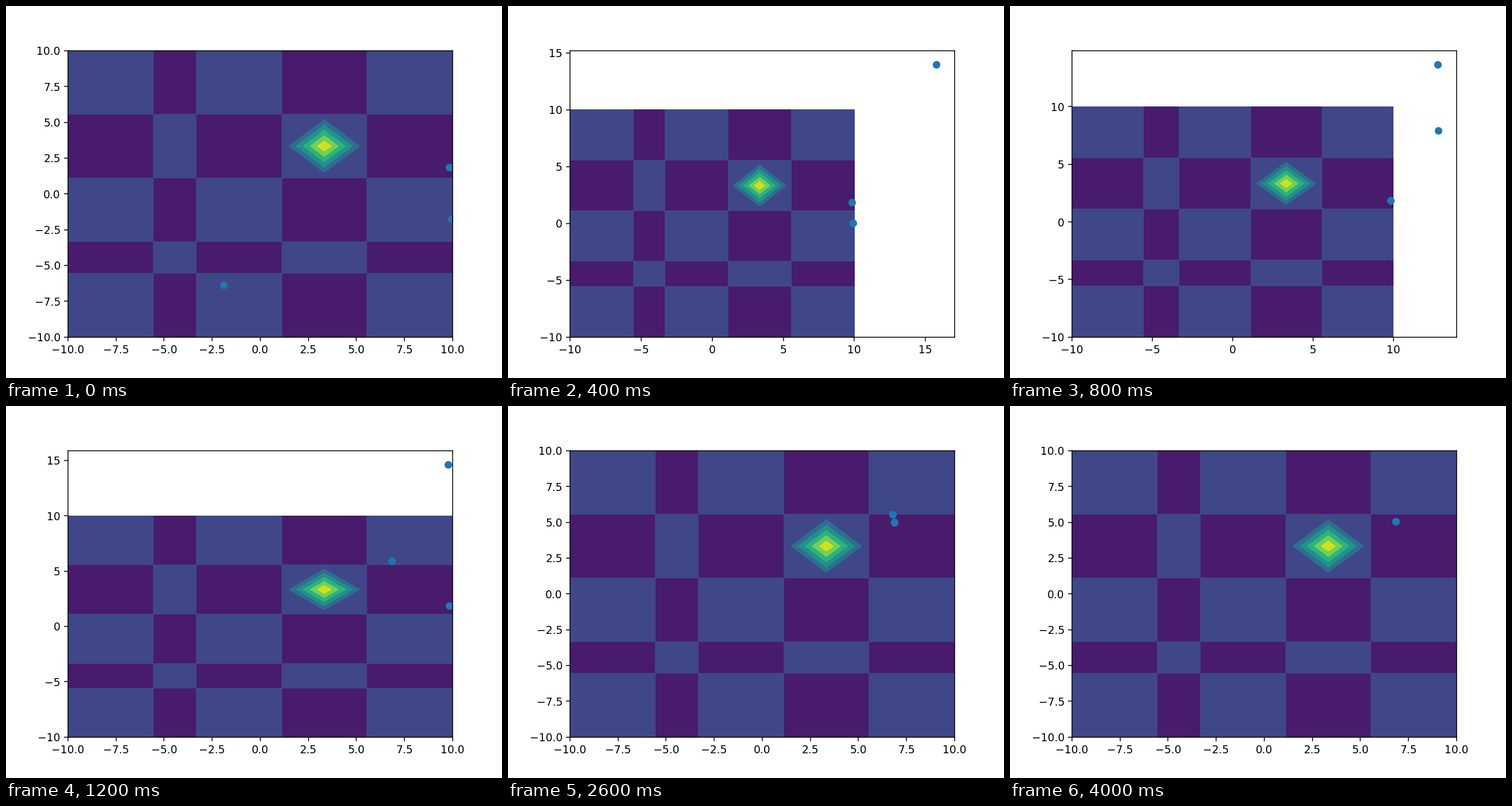
These frames come from a looping animation (864 px wide and 648 px high, 4.2 s). A matplotlib script:

```python
import numpy as np
import matplotlib.pyplot as plt
from matplotlib.animation import FuncAnimation

INTERVAL = 200
START = [(9.82, 1.84), (9.956, -1.76), (-1.9, -6.38)]

# Simplex search: (move, vertex index) for each step.
STEPS = [
    ("reflect", 2), ("shrink", 0), ("reflect", 1), ("shrink", 0),
    ("reflect", 2), ("reflect", 1), ("shrink", 1), ("reflect", 2),
    ("shrink", 2), ("reflect", 0), ("shrink", 2), ("shrink", 2),
    ("shrink", 1), ("shrink", 2), ("shrink", 2), ("shrink", 0),
    ("shrink", 0), ("shrink", 2), ("shrink", 2), ("shrink", 2),
]


def easom(x, y):
    return np.cos(x) * np.cos(y) * np.exp(-(x - np.pi) ** 2 - (y - np.pi) ** 2)


def reflect(simplex, i):
    """Mirror vertex i; the x centroid serves for both coordinates."""
    out = simplex.copy()
    center = np.delete(simplex[:, 0], i).mean()
    out[i] = 2 * center - simplex[i]
    return out


def shrink(simplex, i):
    """Pull every vertex halfway towards vertex i."""
    return (simplex + simplex[i]) / 2


def search():
    moves = {"reflect": reflect, "shrink": shrink}
    path = [np.array(START)]
    for name, i in STEPS:
        path.append(moves[name](path[-1], i))
    return path


axis = np.linspace(-10, 10, 10)
X, Y = np.meshgrid(axis, axis)
Z = easom(X, Y)
path = search()

fig, ax = plt.subplots(figsize=(6.4, 4.8), dpi=135)


def draw(frame):
    ax.clear()
    ax.contourf(X, Y, Z)
    ax.scatter(path[frame][:, 0], path[frame][:, 1], color="C0")


anim = FuncAnimation(fig, draw, frames=len(path), interval=INTERVAL,
                     repeat=True, repeat_delay=0)
plt.show()
```
